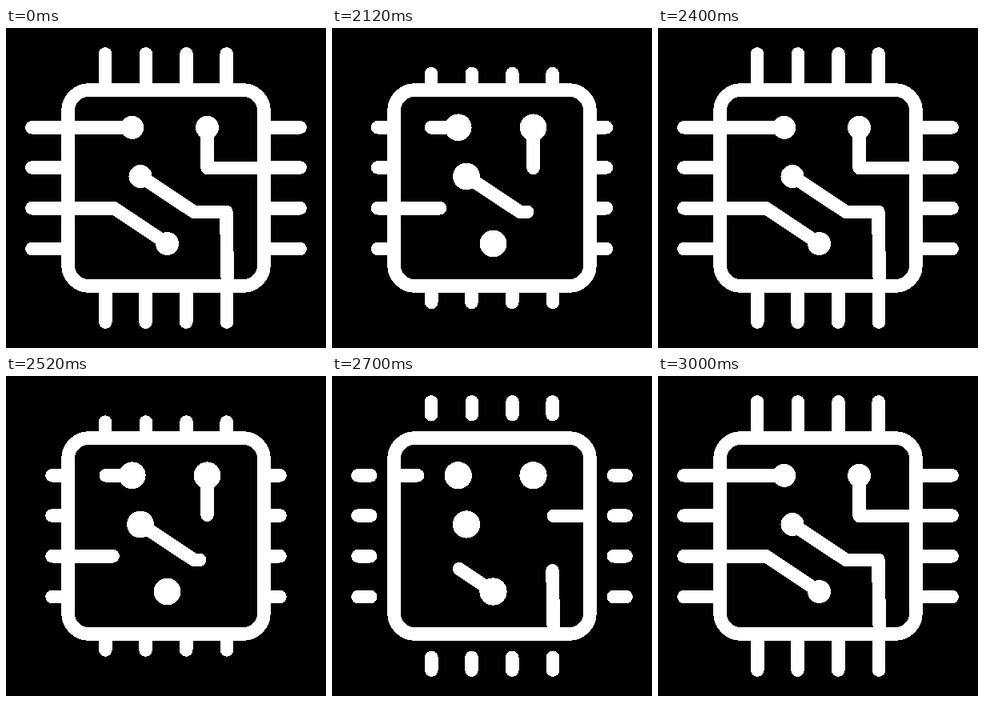
An HTML page for the animation above (3.02 s loop, 400 by 400 pixels).

```html
<!DOCTYPE html>
<html lang="en">
<head>
<meta charset="utf-8">
<title>Chip</title>
<style>
  /* Each unit of --p either erases or redraws every line once. */
  @property --p {
    syntax: "<number>";
    inherits: true;
    initial-value: 0;
  }

  html, body {
    margin: 0;
    width: 100%;
    height: 100%;
    overflow: hidden;
    background: #000;
  }

  svg {
    display: block;
    width: 100%;
    height: 100%;
    shape-rendering: crispEdges;
    animation: flow 3020ms infinite;
  }

  .body, .line {
    fill: none;
    stroke: #fff;
    stroke-width: 16.6px;
    stroke-linecap: round;
    stroke-linejoin: round;
  }

  .line {
    stroke-dasharray: 1 1;
    stroke-dashoffset: calc(var(--p) * -1px);
  }

  /* Dots swell while their lines are gone. */
  .dot {
    fill: #fff;
    r: calc(14.5px + 1.9px * (1 - cos(var(--p) * 180deg)));
  }

  /* 25 ms ticks: still, then a quick start and a slow finish */
  @keyframes flow {
    0%     { --p: 0;    animation-timing-function: steps(1); }
    66.88% { --p: .04;  animation-timing-function: steps(4); }
    70.19% { --p: .58;  animation-timing-function: steps(6); }
    75.16% { --p: 1.36; animation-timing-function: steps(10); }
    83.44% { --p: 2.59; animation-timing-function: steps(7); }
    89.23% { --p: 3.37; animation-timing-function: steps(3); }
    91.72% { --p: 3.64; animation-timing-function: steps(3); }
    94.2%  { --p: 3.84; animation-timing-function: steps(3); }
    96.68% { --p: 3.96; animation-timing-function: steps(3); }
    99.17%, 100% { --p: 4; }
  }
</style>
</head>
<body>
<svg viewBox="0 0 400 400">
  <rect class="body" x="77.5" y="77.5" width="245" height="245" rx="26"/>

  <g id="pins">
    <path class="line" pathLength="1" d="M32.4 124.3H75"/>
    <path class="line" pathLength="1" d="M32.4 174.5H75"/>
    <path class="line" pathLength="1" d="M32.4 225.2H75"/>
    <path class="line" pathLength="1" d="M32.4 276H75"/>
  </g>
  <use href="#pins" transform="rotate(90 200 200)"/>
  <use href="#pins" transform="matrix(-1 0 0 1 400 0)"/>
  <use href="#pins" transform="rotate(270 200 200)"/>

  <path class="line" pathLength="1" d="M77 124.3H158"/>
  <path class="line" pathLength="1" d="M322 174.8H251.5V124"/>
  <path class="line" pathLength="1" d="M277 322L275.3 229.8H235L168 185.5"/>
  <path class="line" pathLength="1" d="M201.5 269.5L135 225.2H77"/>

  <circle class="dot" cx="157.7" cy="124.3" r="14.5"/>
  <circle class="dot" cx="251.5" cy="124.3" r="14.5"/>
  <circle class="dot" cx="168" cy="185.5" r="14.5"/>
  <circle class="dot" cx="201.5" cy="269.5" r="14.5"/>
</svg>
</body>
</html>
```
